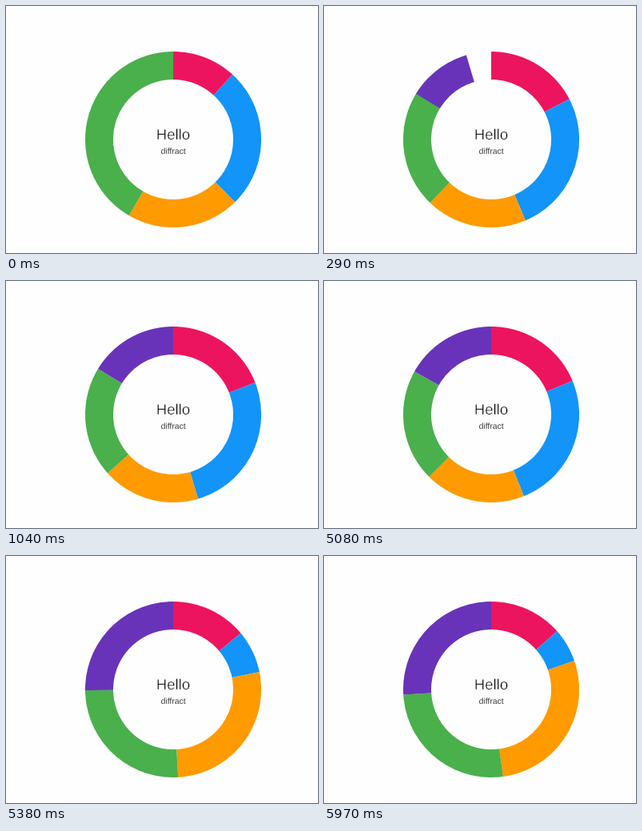
Write a matplotlib script that moves like this. It is 390 by 309 pixels and loops after 8000 ms.

```python
import numpy as np
import matplotlib.pyplot as plt
from matplotlib.animation import FuncAnimation
from matplotlib.patches import PathPatch, Wedge
from matplotlib.textpath import TextPath
from matplotlib.transforms import Affine2D

W, H, DPI = 390, 309, 100
LOOP, STEP = 8000, 20
CX, CY = 209, H - 167
OUTER, RING = 110, 35
BG = "#fefefe"
COLORS = ["#ed145f", "#1294f8", "#ff9a00", "#49b04c", "#6833b9"]

# Clockwise end angle of the first four slices in each state
FOUR = np.array([42.4, 135.4, 210.1, 360.0])
FIVE = np.array([68.7, 163.6, 228.1, 301.3])
LAST = np.array([48.5, 70.9, 172.2, 266.6])

# The picture refreshes only at these times (ms)
TICKS = np.array([0, 140, 290, 440, 590, 740, 890, 1040,
                  5080, 5230, 5380, 5530, 5680, 5820, 5970])
FIRST_START, NEW_START, SECOND_START = 66, 87, 5049
RATE = 0.0125


def spring(elapsed):
    """Critically damped spring going from 0 to 1."""
    a = RATE * max(elapsed, 0)
    return 1 - (1 + a) * np.exp(-a)


def slices(t):
    """Return (start, end) clockwise angles of the five slices."""
    ends = FOUR + (FIVE - FOUR) * spring(t - FIRST_START)
    new_start = FIVE[-1]
    new_end = new_start + (360 - new_start) * spring(t - NEW_START)
    if t > SECOND_START:
        ends = FIVE + (LAST - FIVE) * spring(t - SECOND_START)
        new_start, new_end = ends[-1], 360
    starts = [0, *ends[:-1], new_start]
    return list(zip(starts, [*ends, new_end]))


fig = plt.figure(figsize=(W / DPI, H / DPI), dpi=DPI, facecolor=BG)
ax = fig.add_axes([0, 0, 1, 1])
ax.set_xlim(0, W)
ax.set_ylim(0, H)
ax.axis("off")

wedges = [ax.add_patch(Wedge((CX, CY), OUTER, 0, 1, width=RING, fc=c, lw=0))
          for c in COLORS]


def label(text, size, baseline, color, trim):
    """Centred text; a background outline thins the strokes to a light weight."""
    path = TextPath((0, 0), text, size=size, prop={"family": "Liberation Sans"})
    box = path.get_extents()
    shift = Affine2D().translate(CX + 0.3 - (box.x0 + box.x1) / 2, H - baseline)
    ax.add_patch(PathPatch(shift.transform_path(path), fc=color, ec=BG,
                           lw=trim * 72 / DPI))


label("Hello", 18.6, 167, "#000000", 0.5)
label("diffract", 10.4, 185, "#000000", 0.2)


def update(i):
    now = i * STEP + STEP / 2
    t = TICKS[TICKS <= now][-1]
    for wedge, (start, end) in zip(wedges, slices(t)):
        wedge.set_theta1(90 - end)
        wedge.set_theta2(90 - start)
        wedge.set_visible(end - start > 0.01)
    return wedges


anim = FuncAnimation(fig, update, frames=LOOP // STEP, interval=STEP,
                     repeat=True, repeat_delay=0)
plt.show()
```
